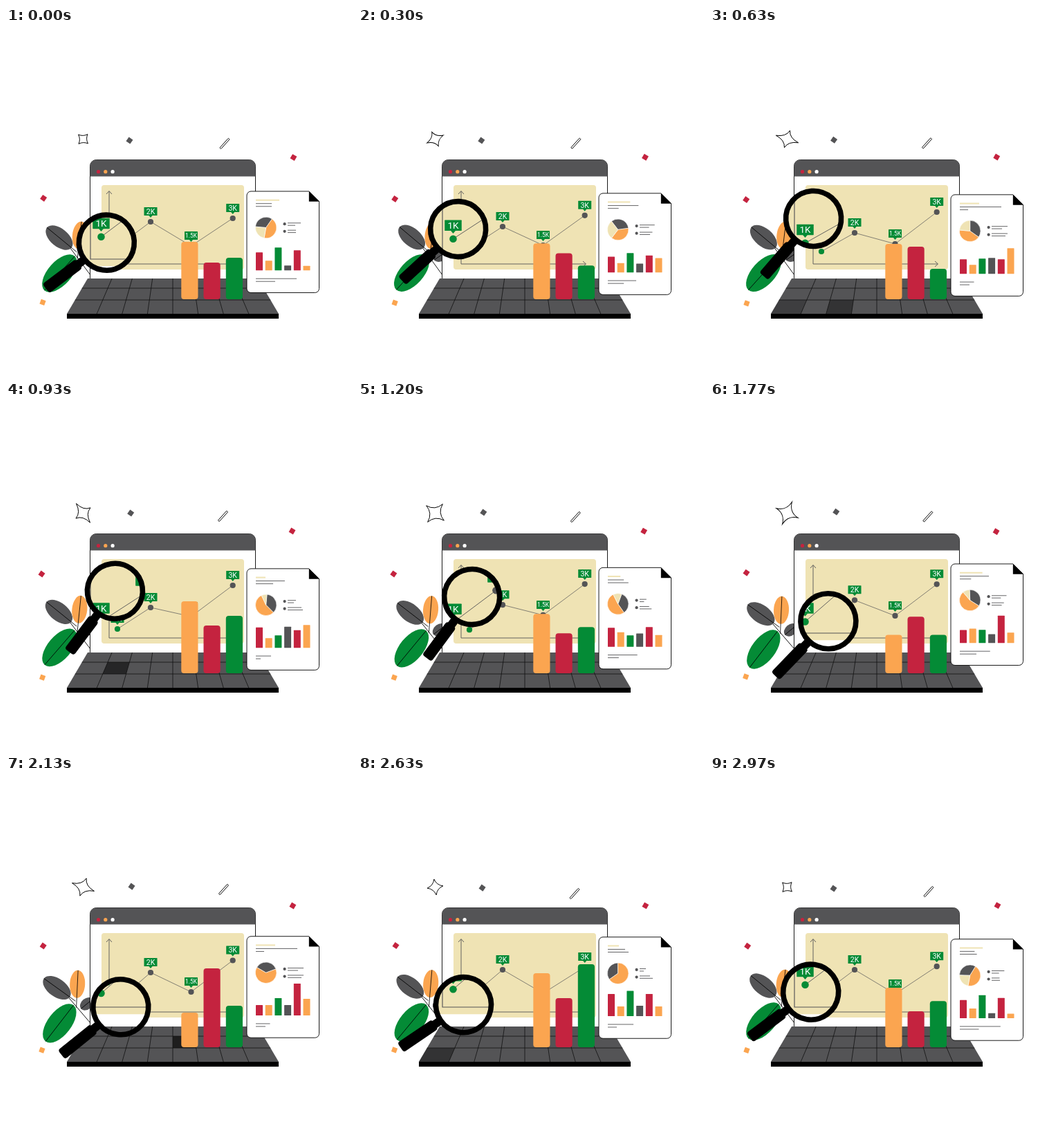
Write an HTML page with a canvas that moves like this. It is 500x500 px and loops after 3000 ms.

```html
<!DOCTYPE html>
<html lang="en">
<head>
<meta charset="utf-8">
<title>Data report</title>
<style>
html, body { margin: 0; width: 100%; height: 100%; overflow: hidden; background: #fff; }
canvas { display: block; width: 500px; height: 500px; }
</style>
</head>
<body>
<canvas id="stage" width="500" height="500"></canvas>
<script>
const c = document.getElementById('stage').getContext('2d');
const GREY = '#545456', RED = '#c4233f', ORANGE = '#fba550', GREEN = '#048b36', CREAM = '#efe3b4', BLACK = '#000';
const LOOP = 3000, RAD = Math.PI / 180;
let now = 0;

// Periodic monotone cubic through a few poses
function track(times, period) {
  return (...v) => {
    const n = v.length, t = now % period;
    const time = i => times[(i + n) % n] + Math.floor(i / n) * period;
    const val = i => v[(i + n) % n];
    const slope = i => (val(i + 1) - val(i)) / (time(i + 1) - time(i));
    const tangent = i => {
      const a = slope(i - 1), b = slope(i);
      return a * b <= 0 ? 0 : 2 * a * b / (a + b);
    };
    let i = n - 1;
    while (times[i] > t) i--;
    const h = time(i + 1) - time(i), u = (t - time(i)) / h, w = 1 - u;
    return w * w * (1 + 2 * u) * val(i) + u * u * (3 - 2 * u) * val(i + 1)
      + h * u * w * (w * tangent(i) - u * tangent(i + 1));
  };
}
const slow = track([0, 630, 930, 1430, 2130, 2630, 2970], LOOP);
const fast = track([0, 630, 930, 1130, 1430], LOOP / 2);
const wave = (mid, amp, peak) => mid + amp * Math.cos(2 * Math.PI * (now - peak) / LOOP);

function paint(fill, stroke, width = 0.9) {
  if (fill) { c.fillStyle = fill; c.fill(); }
  if (stroke) { c.strokeStyle = stroke; c.lineWidth = width; c.stroke(); }
}
function poly(points, fill, stroke, width) {
  c.beginPath();
  points.forEach(([x, y]) => c.lineTo(x, y));
  if (fill) c.closePath();
  paint(fill, stroke, width);
}
function box(x, y, w, h, r, fill, stroke) {
  c.beginPath();
  c.roundRect(x, y, w, h, r);
  paint(fill, stroke);
}
function dot(x, y, r, fill) {
  c.beginPath();
  c.arc(x, y, r, 0, 7);
  paint(fill);
}
function at(x, y, deg, draw) {
  c.save();
  c.translate(x, y);
  c.rotate(deg * RAD);
  draw();
  c.restore();
}

function leaf(x, y, deg, rx, ry, fill, tail) {
  at(x, y, deg, () => {
    c.beginPath();
    c.ellipse(0, 0, rx, ry, 0, 0, 7);
    paint(fill);
    poly([[-rx, 0], [rx + tail, 0]], null, BLACK, 0.8);
  });
}
function plant() {
  at(122, 357, wave(-2.2, 2.4, 400), () => {
    c.translate(-122, -357);
    poly([[122, 357], [92, 316]], null, BLACK, 0.9);
    leaf(119, 329, -35, 11, 8, GREY, 0);
    leaf(77.5, 302.5, 40, 23, 13, GREY, 10);
    leaf(107.5, 299.5, 97, 20, 11, ORANGE, 14);
    leaf(77.5, 354, -48, 33, 17, GREEN, 0);
  });
}

function label(x, y, text, size) {
  const top = y - 21;
  box(x - 9.5, top, 19, 12, 0.5, GREEN);
  poly([[x - 3, top + 11.5], [x + 3, top + 11.5], [x, top + 15]], GREEN);
  c.fillStyle = '#fff';
  c.font = size + 'px Roboto, Arial, sans-serif';
  c.textAlign = 'center';
  c.textBaseline = 'alphabetic';
  c.fillText(text, x, top + 6 + size * 0.36);
}
function graph() {
  const points = [
    [161, slow(316, 323, 328, 329.5, 325.5, 321), '1K', 10.5, GREEN],
    [209, slow(280, 296, 297, 289, 284, 280), '2K', 10.5, GREY],
    [267.5, slow(315, 312, 310, 307, 312, 314), '1.5K', 8.5, GREY],
    [327.7, slow(275, 266, 265, 262, 266.5, 276), '3K', 10.5, GREY]
  ];
  box(138, 227, 206, 122, 4, CREAM);
  poly([[149, 236], [149, 341], [329, 341]], null, GREY, 0.9);
  poly([[145, 240], [149, 235.5], [153, 240]], null, GREY, 0.9);
  poly([[325, 337], [329.5, 341], [325, 345]], null, GREY, 0.9);
  poly(points, null, GREY, 0.7);
  for (const [x, y, text, size, color] of points) {
    dot(x, y, 4.1, color);
    label(x, y, text, size);
  }
}

function laptop() {
  box(121.5, 190.5, 239, 172, [9, 9, 0, 0], '#fff', BLACK);
  box(121.5, 190.5, 239, 24, [9, 9, 0, 0], GREY);
  [RED, ORANGE, '#fff'].forEach((color, i) => dot(133.5 + i * 10.3, 207.7, 2.6, color));
  graph();
  poly([[118, 362], [364, 362], [394, 413], [88, 413]], GREY);
  keys();
  box(88, 413, 306, 7, 0, BLACK);
}
const rows = [362, 376, 393, 413];
const keyX = (col, y) => {
  const d = (y - 362) / 51;
  return 241 + (Math.abs(col) < 4 ? col * (29.3 + 7.3 * d) : Math.sign(col) * (123 + 30 * d));
};
// row, column, peak time, strength
const presses = [
  [2, -4, 660, 0.3], [2, -2, 630, 0.4], [1, -3, 930, 0.55], [0, 1, 1430, 0.3],
  [1, 2, 1430, 0.3], [1, 0, 2130, 0.65], [2, -4, 2630, 0.4]
];
function keys() {
  for (const [row, col, peak, strength] of presses) {
    const y = rows[row], y2 = rows[row + 1];
    c.globalAlpha = strength * Math.max(0, 1 - Math.abs(now - peak) / 220);
    poly([[keyX(col, y), y], [keyX(col + 1, y), y], [keyX(col + 1, y2), y2], [keyX(col, y2), y2]], BLACK);
  }
  c.globalAlpha = 1;
  for (const y of rows.slice(1, 3)) poly([[keyX(-4, y), y], [keyX(4, y), y]], null, '#111', 0.8);
  for (let col = -3; col < 4; col++) poly([[keyX(col, 362), 362], [keyX(col, 413), 413]], null, '#111', 0.8);
}

function bars() {
  [
    [253.3, ORANGE, slow(309, 312, 288, 325, 342, 285, 306)],
    [285.5, RED, slow(339, 316, 323, 340, 278, 321, 340)],
    [317.8, GREEN, slow(332, 348, 309, 338, 332, 272, 325)]
  ].forEach(([x, color, top]) => box(x, top, 24.2, 392 - top, 4, color));
}

function slice(from, to, color) {
  if (to - from < 0.5) return;
  c.beginPath();
  c.moveTo(375.7, 52.5);
  c.arc(375.7, 52.5, 15.3, (from - 90) * RAD, (to - 90) * RAD);
  c.closePath();
  paint(color, '#fff', 0.6);
}
function rule(x, y, end, color = GREY, width = 0.9) {
  poly([[x, y], [end, y]], null, color, width);
}
function report() {
  c.save();
  c.translate(0, wave(236.3, 4.8, 780));
  c.beginPath();
  c.moveTo(437.8, 0);
  c.lineTo(452.5, 14.5);
  c.arcTo(452.5, 146.5, 446, 146.5, 6);
  c.arcTo(348, 146.5, 348, 140, 6);
  c.arcTo(348, 0, 354, 0, 6);
  c.closePath();
  paint('#fff', BLACK);
  poly([[437.8, 0], [437.8, 14.8], [452.8, 14.8]], BLACK);

  rule(361, 12.7, fast(395, 389, 375, 377, 392), CREAM, 2);
  rule(361, 17.7, fast(384, 421, 403, 386, 381));
  rule(361, 21.8, fast(384, 373, 386, 391, 388));

  const a = slow(-85, 0, 5, 30, -60, -125);
  const b = slow(35, 125, 135, 150, 70, 0);
  const d = slow(190, 275, 335, 330, 300, 235);
  slice(a, b, GREY);
  slice(b, d, ORANGE);
  slice(d, a + 360, CREAM);

  dot(402.6, 47.2, 2.1, GREY);
  dot(402.6, 57.8, 2.1, GREY);
  rule(407, 45.8, fast(426, 430, 419, 416, 424));
  rule(407, 49.2, fast(418, 422, 416, 413, 417));
  rule(407, 56.2, fast(419, 430, 427, 422, 418));
  rule(407, 59.6, fast(419, 427, 429, 426, 419));

  [
    [RED, slow(26, 21, 29.5, 24.5, 15, 32)],
    [ORANGE, slow(14, 13, 14, 25.5, 15, 14)],
    [GREEN, slow(33, 22, 18, 16, 25, 36.5)],
    [GREY, slow(7, 23, 30.5, 10.5, 15, 15)],
    [RED, slow(29, 21, 25.5, 31, 46, 32)],
    [ORANGE, slow(6.5, 37, 33, 6.5, 24, 14)]
  ].forEach(([color, h], i) => box(361 + i * 13.7, 114.3 - h, 10, h, 0.5, color));

  rule(361, 126.2, fast(420, 381.5, 383, 398, 419));
  rule(361, 130.2, fast(389, 375, 368, 374, 387));
  c.restore();
}

function sparkle() {
  const arms = [slow(9.5, 13, 13, 20, 13.5, 11.5), slow(9.5, 17, 17, 16.5, 17, 11.5)];
  at(111.5, 160.5, slow(-47, 18, 54, 27, 20, -8), () => {
    c.beginPath();
    c.moveTo(0, -arms[0]);
    for (let i = 0; i < 4; i++) {
      const tip = i * 90 * RAD, dip = tip - 45 * RAD, r = arms[(i + 1) % 2];
      c.quadraticCurveTo(3.5 * Math.cos(dip), 3.5 * Math.sin(dip), r * Math.cos(tip), r * Math.sin(tip));
    }
    c.closePath();
    paint('#fff', BLACK);
  });
}
function confetti() {
  const chip = (x, y, deg, color) => at(x, y, deg, () => box(-3.6, -3.6, 7.2, 7.2, 0, color));
  chip(wave(180.3, 2, 1700), wave(160.7, 2, 150), 35, GREY);
  chip(wave(414.3, 1.2, 2850), wave(187, 0.5, 2300), 30, RED);
  chip(wave(53, 1.6, 2650), wave(246.8, 1.8, 1000), 35, RED);
  chip(wave(52.5, 0.7, 300), wave(397, 1.2, 1000), 20, ORANGE);

  at(slow(316, 313.5, 313.5, 315, 314.5, 313), slow(167, 166.5, 165, 167, 164, 170), -48, () =>
    box(-9.3, -1.2, 18.6, 2.4, 0.5, '#fff', BLACK));
  sparkle();
}

function magnifier() {
  const x = wave(157.7, 13.4, 1690), y = wave(304.6, 32, 2335), zoom = 1.29;
  c.save();
  c.beginPath();
  c.arc(x, y, 40, 0, 7);
  c.clip();
  c.translate(137.5 - 161 * zoom, 334 - 341 * zoom);
  c.scale(zoom, zoom);
  box(90, 190, 250, 172.7, 0, '#fff');
  graph();
  c.restore();
  at(x, y, wave(136, 9.8, 2620), () => {
    c.beginPath();
    c.arc(0, 0, 40, 0, 7);
    paint(null, BLACK, 7.6);
    box(41, -6, 16, 12, 0, BLACK);
    box(50, -8.3, 60, 16.6, 4, BLACK);
  });
}

function frame(ms) {
  now = ms % LOOP;
  c.clearRect(0, 0, 500, 500);
  plant();
  laptop();
  report();
  bars();
  confetti();
  magnifier();
  requestAnimationFrame(frame);
}
frame(0);
</script>
</body>
</html>
```
